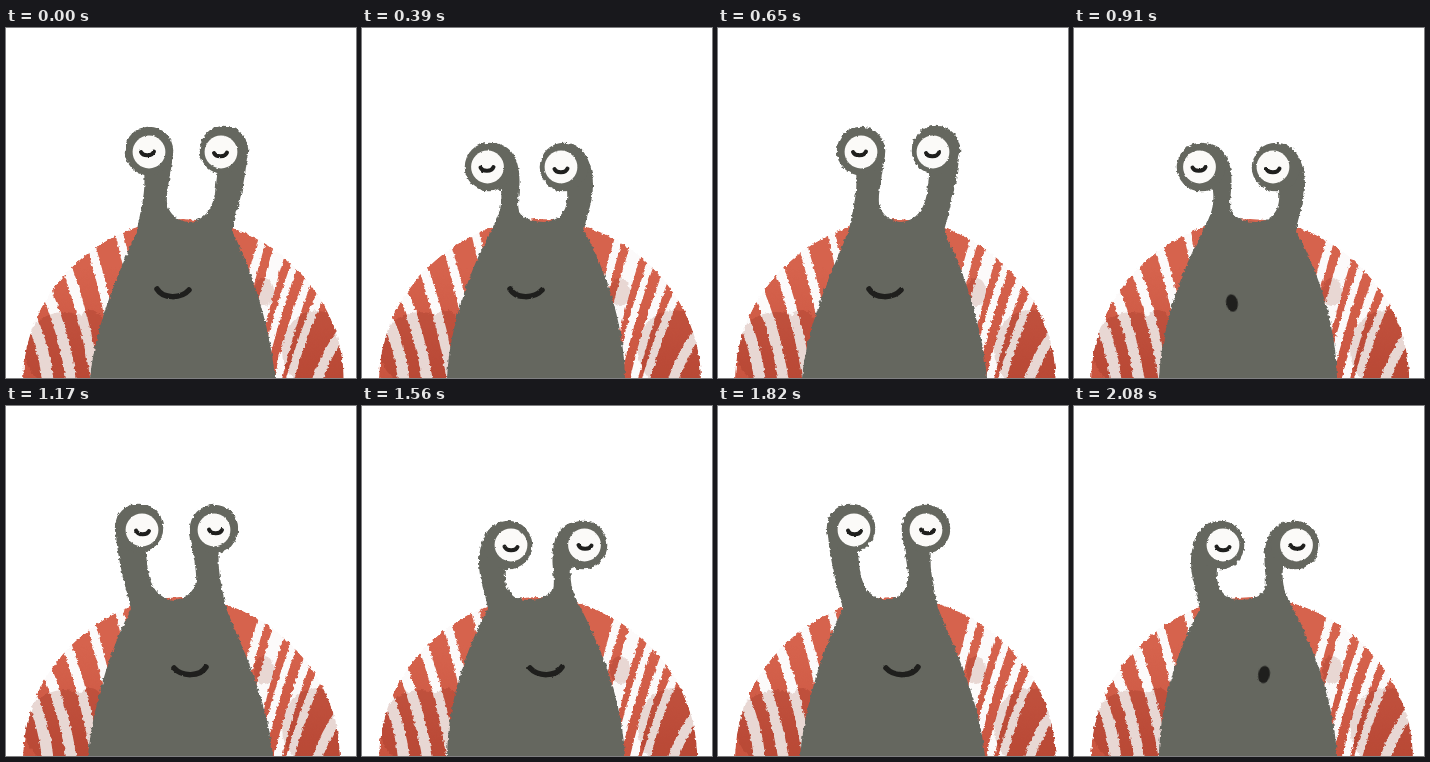
Write an HTML page that moves like this. It is 350 px wide and 350 px high and loops after 2.34 s.

```html
<!DOCTYPE html>
<html lang="en">
<head>
<meta charset="utf-8">
<title>Swaying snail</title>
<style>
  html, body { margin: 0; width: 100%; height: 100%; overflow: hidden; background: #fff; }
  #strip { display: flex; width: 2800px; height: 350px; animation: play 2340ms step-end infinite; }
  #strip svg { flex: none; width: 350px; height: 350px; overflow: hidden; }
  .shade { mix-blend-mode: multiply; }
  @keyframes play {
    0% { transform: translateX(0); }
    16.6667% { transform: translateX(-350px); }
    27.7778% { transform: translateX(-700px); }
    38.8889% { transform: translateX(-1050px); }
    50% { transform: translateX(-1400px); }
    66.6667% { transform: translateX(-1750px); }
    77.7778% { transform: translateX(-2100px); }
    88.8889% { transform: translateX(-2450px); }
  }
</style>
</head>
<body>
<div id="strip"></div>
<script>
const INK = '#1f1f1d', SKIN = '#65675f', EYE = '#fbfaf8';
const BASE = 353, LEFT = 17, TOP = 191;

// Both poses lean left; the second half of the loop mirrors them about `axis`.
const STRETCHED = {
  axis: 175.5,
  body: `M84 360V350C90 290 118 235 131 202C135 180 140 165 138 143L143 123L167 126
    C164 150 160 165 161 175C163 188 174 193 182 194C198 193 206 182 209 165L212 140L241 128
    C240 150 232 180 226 203C243 235 264 295 269 350V360Z`,
  heads: [[143, 123], [218, 122]],
  whites: [[143, 124], [215, 124]],
  lids: [[135, 124], [208, 125]],
  mouthX: 151
};
const CROUCHED = {
  axis: 174,
  body: `M85 360V350C88 290 113 232 130 201C135 190 141 180 139 163L127 139L135 115.5
    C152 119 158 135 157.5 155C157 168 155 175 157 183C162 191 172 194 182 194
    C196 193 207 185 205 163L202 139L209 115.5C224 120 231 138 231 157
    C231 175 224 188 222 203C240 235 262 290 263 350V360Z`,
  heads: [[127, 139], [202, 139]],
  whites: [[125.5, 139], [199, 139]],
  lids: [[118.5, 139.5], [192.5, 141]],
  mouthX: 148
};

const circles = (points, r) =>
  points.map(([x, y]) => `<circle cx="${x}" cy="${y}" r="${r}"/>`).join('');
const smile = x =>
  `<path d="M${x} 261c6 10 24 10 32 1" fill="none" stroke="${INK}" stroke-width="5.5"/>`;
const oval = y =>
  `<ellipse rx="5.8" ry="8.7" transform="translate(158 ${y}) rotate(-10)" fill="${INK}"/>`;

const rough = (id, seed, scale) =>
  `<filter id="${id}" filterUnits="userSpaceOnUse" x="-10" y="-10" width="370" height="380" color-interpolation-filters="sRGB">
    <feTurbulence type="fractalNoise" baseFrequency=".28" numOctaves="2" seed="${seed}"/>
    <feDisplacementMap in="SourceGraphic" scale="${scale}" xChannelSelector="R" yChannelSelector="G"/>
  </filter>`;

// A band from the rim, at an angle in degrees, down to a foot on the ground
function stripe(angle, foot, width, bow) {
  const a = angle * Math.PI / 180;
  const x = 177 + 166 * Math.cos(a), y = BASE - 166 * Math.sin(a);
  return `<path d="M${x} ${y}Q${(x + foot) / 2 + bow} ${(y + BASE) / 2} ${foot} ${BASE + 2}" stroke-width="${width}"/>`;
}

const STRIPES = [0, 1, 2, 3, 4].map(k => stripe(157 - 11 * k, 42 + 24 * k, 11.5 - k * 0.9, 6)).join('')
  + [[61, 222, 8], [54, 240, 13], [47, 254, 7], [40, 271, 8], [33, 283, 8], [17, 310, 10]]
    .map(([angle, foot, width]) => stripe(angle, foot, width, -4)).join('');

const SHADE = [[58, 322, 40, 38], [312, 322, 36, 40], [258, 264, 10, 14], [84, 300, 14, 18]]
  .map(([x, y, rx, ry]) => `<ellipse cx="${x}" cy="${y}" rx="${rx}" ry="${ry}"/>`).join('');

function shell(i) {
  const right = 336.5 + 2.5 * Math.cos((i - 1) * Math.PI / 3);
  const rx = (right - LEFT) / 2, h = BASE - TOP, mid = LEFT + rx;
  const dome = `M${LEFT} ${BASE}C${LEFT} ${BASE - h * .58} ${mid - rx * .48} ${TOP} ${mid} ${TOP}
    S${right} ${BASE - h * .58} ${right} ${BASE}Z`;
  return `<clipPath id="dome${i}"><path d="${dome}"/></clipPath>
    <linearGradient id="red${i}" gradientUnits="userSpaceOnUse" x1="0" y1="${TOP}" x2="0" y2="350">
      <stop offset=".3" stop-color="#d6634d"/><stop offset="1" stop-color="#c9543f"/>
    </linearGradient>
    <g filter="url(#edge${i})">
      <g clip-path="url(#dome${i})">
        <path d="${dome}" fill="url(#red${i})"/>
        <g fill="none" stroke="#fcfafa">${STRIPES}</g>
        <g class="shade" fill="#ebdcd8">${SHADE}</g>
      </g>
    </g>`;
}

function snail(i, pose, mouth, flip) {
  const turn = flip ? `transform="matrix(-1 0 0 1 ${2 * pose.axis} 0)"` : '';
  const lids = pose.lids.map(([x, y]) => `<path d="M${x} ${y}c2 4.5 11 4.5 13-.5"/>`).join('');
  return `<g fill="${SKIN}" filter="url(#edge${i})">
      <g ${turn}><path d="${pose.body}"/>${circles(pose.heads, 24.3)}</g>
    </g>
    <g filter="url(#soft${i})">
      <g ${turn} stroke-linecap="round">
        <g fill="${EYE}">${circles(pose.whites, 16.4)}</g>
        <g fill="none" stroke="${INK}" stroke-width="4">${lids}</g>
        ${mouth}
      </g>
    </g>`;
}

function drawing(i) {
  const flip = i >= 4;
  const pose = i % 2 ? CROUCHED : STRETCHED;
  const mouth = i % 4 === 3 ? oval(flip ? 268.5 : 275) : smile(pose.mouthX);
  return `<svg viewBox="0 0 350 350">
    ${rough('edge' + i, i + 3, 4)}${rough('soft' + i, i + 20, 2)}
    ${shell(i)}${snail(i, pose, mouth, flip)}
  </svg>`;
}

document.getElementById('strip').innerHTML = Array.from({ length: 8 }, (_, i) => drawing(i)).join('');
</script>
</body>
</html>
```
